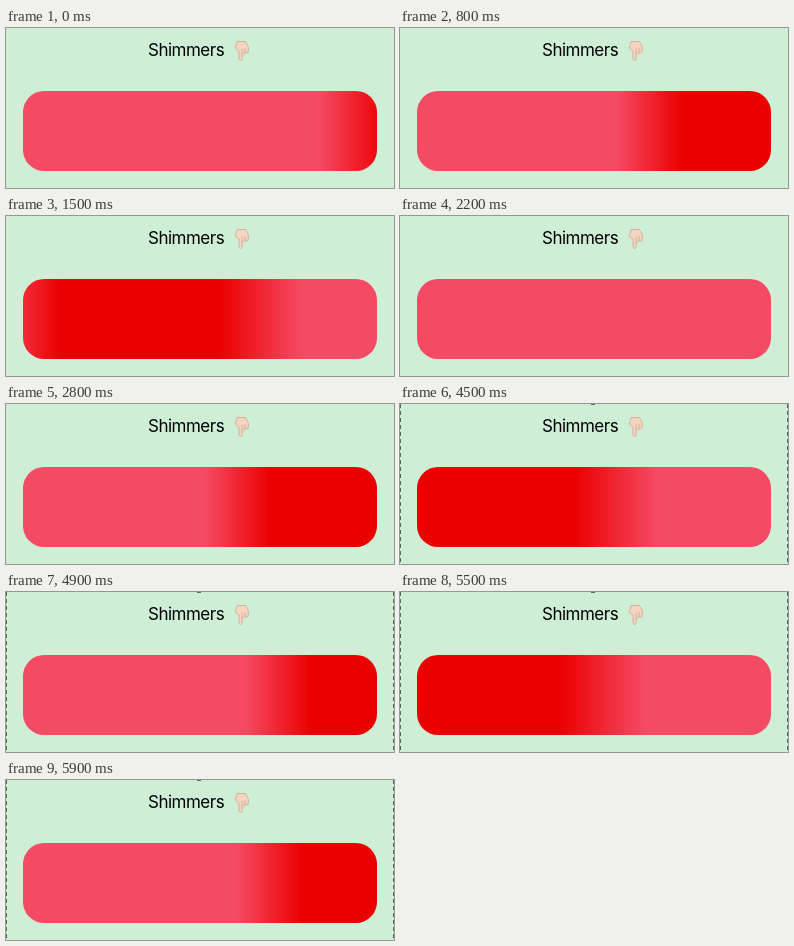
Write an HTML page that moves like this. It is 388 by 160 pixels and loops after 6 s.

```html
<!DOCTYPE html>
<html lang="en">
<head>
<meta charset="utf-8">
<title>Shimmers</title>
<style>
  html, body { margin: 0; width: 100%; height: 100%; overflow: hidden; background: #cfeed6; }
  svg { position: absolute; left: 0; top: 0; }
  text { font: 17px Inter, "Liberation Sans", sans-serif; letter-spacing: -.5px; }
  #card { position: absolute; left: 17px; top: 63px; width: 354px; height: 80px; border-radius: 21px; }
</style>
</head>
<body>
<div id="card"></div>
<svg width="388" height="160" viewBox="0 0 388 160">
  <text x="142" y="28">Shimmers</text>
  <g fill="#f6d5c0" stroke="#c9a08c" stroke-width=".7" stroke-linejoin="round">
    <path d="M231 13.5h8.5l2.8 5v4.5q0 2-1.6 2t-1.7-1.5v1q0 1.5-1.4 1.5t-1.5-1.2v6q0 1.7-1.5 1.7t-1.6-1.7v-7.600l-3.200-2.400q-1.500-1.500.2-3.300z"/>
    <path d="M236.100 24.500v-4M239 23.500v-3.500" fill="none"/>
  </g>
  <g id="frame" fill="none" stroke="#59655d">
    <path d="M.5 0V160M387.500 0V160" stroke-dasharray="4 3"/>
    <path d="M191 .5h4"/>
  </g>
</svg>
<script>
  const LOOP = 6000, CYCLE = 1015, SWEEP = 1000, START = 165, FRAME_AT = 3600;
  const PINK = '#f54a64', RED = '#eb0000';
  const card = document.getElementById('card');
  const frame = document.getElementById('frame');

  // cubic-bezier(0, 0, .58, 1), solved by bisection
  function easeOut(u) {
    let lo = 0, hi = 1;
    for (let i = 0; i < 24; i++) {
      const p = (lo + hi) / 2;
      if (p * p * (1.74 - .74 * p) < u) lo = p; else hi = p;
    }
    return lo * lo * (3 - 2 * lo);
  }

  function draw() {
    const t = performance.now() % LOOP;
    const u = Math.min(1, (t - START + CYCLE) % CYCLE / SWEEP);
    const tail = -307 + 660 * easeOut(u);
    const head = tail + 233;
    card.style.background = `linear-gradient(90deg, ${PINK} ${tail - 33}px, ${RED} ${tail + 33}px, ` +
      `${RED} ${head - 42}px, ${PINK} ${head + 42}px)`;
    frame.style.display = t < FRAME_AT ? 'none' : '';
    requestAnimationFrame(draw);
  }
  draw();
</script>
</body>
</html>
```
